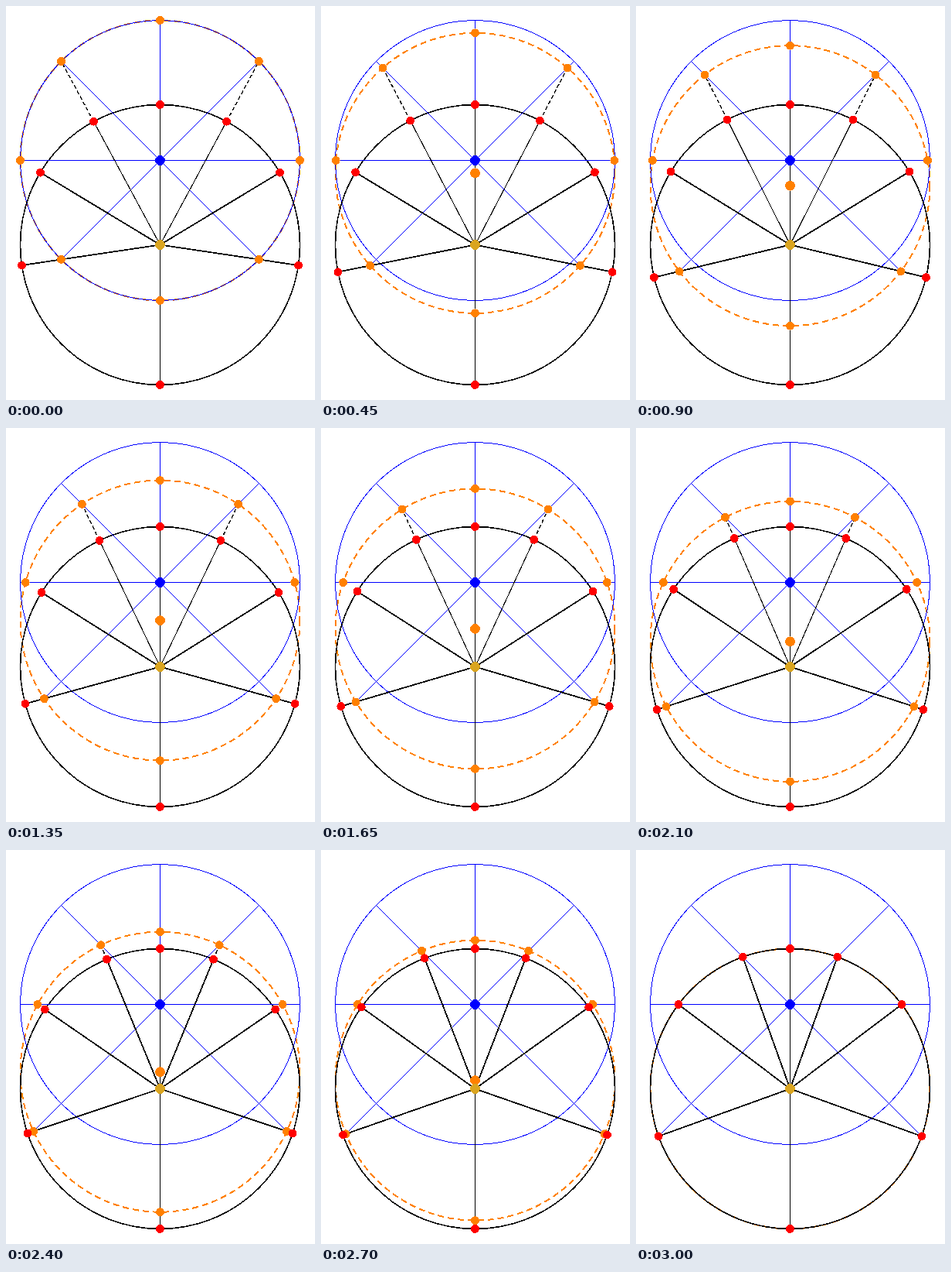
An HTML page for the animation above (3150 ms loop, 400 px wide and 509 px high).

```html
<!DOCTYPE html>
<html lang="en">
<head>
<meta charset="utf-8">
<title>Circle projection</title>
<style>
  html, body { margin: 0; width: 100%; height: 100%; overflow: hidden; background: #fff; }
  svg { display: block; width: 400px; height: 509px; shape-rendering: crispEdges; fill: none; }
</style>
</head>
<body>
<svg id="stage" viewBox="0 0 400 509"></svg>
<script>
const stage = document.getElementById("stage");
const STEP_MS = 150, STEPS = 20;
const X = 199.5, TOP = 199.5, BOTTOM = 308.5, R = 181;
const BLUE = "#00f", ORANGE = "#ff8000", RED = "#f00", GOLD = "#daa520", BLACK = "#000";
const D = Math.SQRT1_2;
const RAYS = [[0, -1], [D, -D], [1, 0], [D, D], [0, 1], [-D, D], [-1, 0], [-D, -D]];

const ring = (y, color, width, dash = "none") =>
  `<circle cx="${X}" cy="${y}" r="${R}" stroke="${color}" stroke-width="${width}" stroke-dasharray="${dash}"/>`;
const dot = ([x, y], color, r = 5.4) =>
  `<circle cx="${x}" cy="${y}" r="${r}" fill="${color}"/>`;
const line = ([x1, y1], [x2, y2], color, width, dash = "none") =>
  `<path d="M${x1} ${y1}L${x2} ${y2}" stroke="${color}" stroke-width="${width}" stroke-dasharray="${dash}"/>`;

// Where a ray from the fixed centre meets the moving circle, shifted down by s.
function meet([dx, dy], s) {
  const k = dy * s + Math.sqrt(R * R - s * s * dx * dx);
  return [X + k * dx, TOP + k * dy];
}

// Central projection of a point onto the lower circle.
function project([x, y]) {
  const k = R / Math.hypot(x - X, y - BOTTOM);
  return [X + (x - X) * k, BOTTOM + (y - BOTTOM) * k];
}

function draw(step) {
  const shift = (BOTTOM - TOP) * step / STEPS;
  const hub = [X, TOP], focus = [X, BOTTOM];
  const points = RAYS.map(ray => meet(ray, shift));
  const images = points.map(project);
  let out = ring(TOP + shift, ORANGE, 2, "8 5") + ring(TOP, BLUE, 1) + ring(BOTTOM, BLACK, 1.6);

  RAYS.forEach(([dx, dy], i) => {
    const end = dy > 0 ? points[i] : [X + R * dx, TOP + R * dy];
    out += line(hub, end, BLUE, 1);
  });
  RAYS.forEach(([dx, dy], i) => {
    const upperDiagonal = dx && dy < 0;
    const steep = Math.abs(images[i][0] - X) / (BOTTOM - images[i][1]);
    out += line(focus, images[i], BLACK, upperDiagonal && steep > 0.43 ? 1.1 : 1.8);
    if (upperDiagonal) out += line(images[i], points[i], BLACK, 1.4, "5 3");
  });

  out += points.map(p => dot(p, ORANGE)).join("");
  out += images.map(p => dot(p, RED)).join("");
  out += dot([X, TOP + shift], ORANGE, 6.4) + dot(hub, BLUE, 6.4) + dot(focus, GOLD, 6.4);
  stage.innerHTML = out;
}

let shown = -1;
function tick() {
  const step = Math.floor(performance.now() / STEP_MS) % (STEPS + 1);
  if (step !== shown) draw(shown = step);
  requestAnimationFrame(tick);
}
tick();
</script>
</body>
</html>
```
